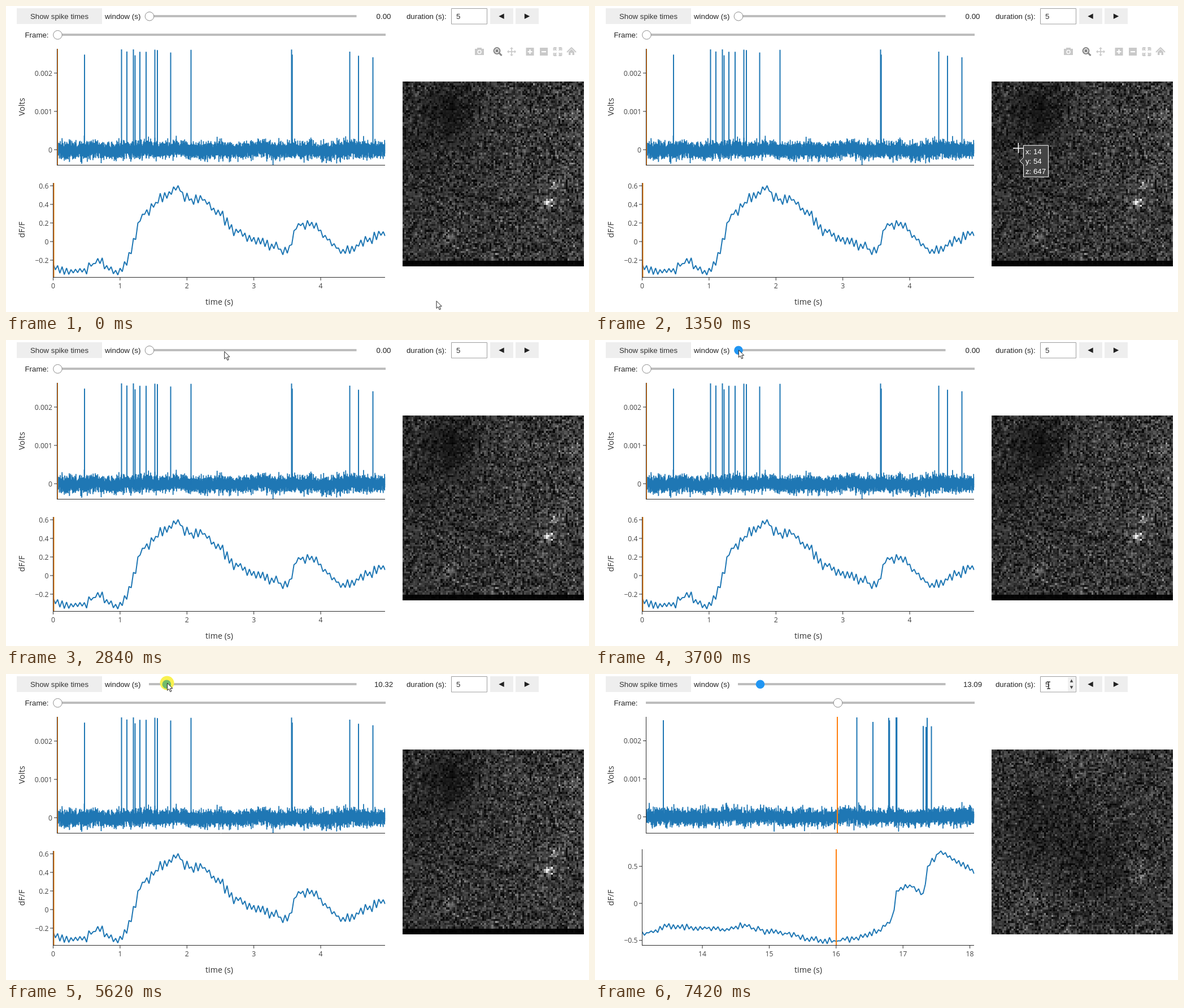
Animation, 1032 px wide and 543 px high, one loop 8 s. Source, as an HTML page with a canvas:

```html
<!DOCTYPE html>
<html lang="en">
<head>
<meta charset="utf-8">
<title>Spike viewer</title>
<style>
html, body { margin: 0; width: 100%; height: 100%; overflow: hidden; background: #fff; }
canvas { display: block; }
</style>
</head>
<body>
<canvas id="stage" width="1032" height="543"></canvas>
<script>
const ctx = document.getElementById('stage').getContext('2d');
const LOOP = 8000, REDRAW = 6980, PRESS = 4830, RELEASE = 6490;
const BLUE = '#1f77b4', ORANGE = '#ff7f0e', ACCENT = '#2196f3', INK = '#2a2a2a';
const UI = '13.25px "Liberation Sans", Arial, sans-serif';
const TICK = '12.25px "Open Sans", sans-serif';
const TITLE = '14.25px "Open Sans", sans-serif';
const MAP = { x: 702, y: 134, w: 321, h: 328, cols: 100, rows: 96 };

const clamp = (v, a = 0, b = 1) => Math.min(b, Math.max(a, v));
const ramp = (t, a, b) => clamp((t - a) / (b - a));

// Linear interpolation through [position, ...values] points
function along(points, at) {
  let i = points.findIndex(p => p[0] > at);
  if (i < 0) i = points.length - 1;
  i = Math.max(i, 1);
  const a = points[i - 1], b = points[i], k = ramp(at, a[0], b[0]);
  return a.slice(1).map((v, j) => v + (b[j + 1] - v) * k);
}

function seeded(seed) {
  return () => {
    seed = (seed + 0x6D2B79F5) | 0;
    let r = Math.imul(seed ^ (seed >>> 15), 1 | seed);
    r = (r + Math.imul(r ^ (r >>> 7), 61 | r)) ^ r;
    return ((r ^ (r >>> 14)) >>> 0) / 4294967296;
  };
}
function gaussian(rand) {
  return Math.sqrt(-2 * Math.log(rand() + 1e-9)) * Math.cos(6.2832 * rand());
}

// Pointer path: time, x, y
const PATH = [
  [590, 762, 523], [1000, 785, 390], [1250, 752, 275], [1350, 749, 252], [1400, 748, 250],
  [1960, 602, 122], [2150, 580, 117], [2210, 577, 116], [2840, 387, 20], [2950, 361, 21],
  [3020, 358, 21], [3450, 256, 19], [3760, 254, 17], [4200, 254, 18], [4880, 254, 18],
  [5820, 294, 15], [6810, 294, 15], [6860, 295, 15], [7420, 803, 20]
];
function pointer(t) {
  const [x, y] = along(PATH, t);
  return { x, y };
}

function voltage(seed, mid) {
  const rand = seeded(seed), pts = [];
  for (let x = 91; x <= 671; x += 0.08) {
    const drift = 2 * Math.sin(x / 17) * Math.sin(x / 41);
    pts.push([x, mid + drift + 7.2 * gaussian(rand)]);
  }
  return pts;
}
function spikes(seed, xs) {
  const rand = seeded(seed);
  return xs.map(x => [x, 77 + 18 * rand() ** 2]);
}
// Smooth course with a saw-like jitter, one sample per camera frame
function fluorescence(seed, course, jitter) {
  const rand = seeded(seed), pts = [];
  for (let i = 0; i < 150; i++) {
    const x = Math.min(83.5 + 3.947 * i, 671);
    const side = i % 2 ? 1 : -1;
    pts.push([x, along(course, x)[0] + side * jitter * rand()]);
  }
  return pts;
}
function ticks(first, last, step, place, label) {
  const list = [];
  for (let v = first; v <= last + step / 2; v += step) list.push([label(v), place(v)]);
  return list;
}

function heatmap(seed, level) {
  const c = document.createElement('canvas');
  c.width = MAP.cols;
  c.height = MAP.rows;
  const g = c.getContext('2d'), rand = seeded(seed);
  for (let y = 0; y < MAP.rows; y++) for (let x = 0; x < MAP.cols; x++) {
    const base = level(x, y);
    const v = Math.round(clamp(base * (1 + 0.54 * gaussian(rand)), base * 0.15, 245));
    g.fillStyle = `rgb(${v},${v},${v})`;
    g.fillRect(x, y, 1, 1);
  }
  return c;
}
const blob = (x, y, cx, cy, r) => Math.exp(-((x - cx) ** 2 + (y - cy) ** 2) / (r * r));

const plain = v => String(Math.round(v * 1000) / 1000).replace('-', '−');

const VIEWS = [{
  spikes: spikes(3, [139, 204.5, 214, 225.5, 228.5, 237, 248, 263.5, 268, 291.5, 327.5,
    505.5, 506.7, 608.5, 624, 649.5]),
  volts: voltage(11, 255.5),
  dff: fluorescence(8, [[84, 459], [107, 474], [131, 472], [166, 452], [196, 474], [218, 447],
    [238, 376], [280, 334], [305, 323], [322, 343], [348, 340], [380, 370], [400, 396], [435, 412],
    [490, 434], [504, 424], [514, 387], [548, 390], [580, 427], [604, 435], [671, 401]], 11),
  top: 314, cursor: [91, 84.5], frame: 91.5,
  voltTicks: ticks(0, 0.002, 0.001, v => 255 - v * 68000, plain),
  dffTicks: ticks(-0.2, 0.6, 0.2, v => 418 - v * 165, plain),
  timeTicks: ticks(0, 4, 1, v => 83.5 + v * 118.4, plain),
  map: heatmap(5, (x, y) => y > 92 ? 4 : 48 + 0.09 * x
    - 26 * blob(x, y, 27, 14, 15) - 8 * blob(x, y, 6, 40, 30)
    + 160 * blob(x, y, 80, 62.5, 2.4) + 40 * blob(x, y, 84, 53, 3)
    + 30 * blob(x, y, 95, 16, 4) + 18 * blob(x, y, 24, 80, 7))
}, {
  spikes: spikes(6, [121, 463.5, 492, 520, 521.3, 533, 534.3, 581, 586, 588, 595.5]),
  volts: voltage(29, 253.5),
  dff: fluorescence(4, [[84, 463], [127, 447], [200, 452], [226, 454], [262, 445], [300, 457],
    [340, 460], [372, 470], [427, 474], [470, 468], [510, 451], [526, 433], [534, 387], [560, 373],
    [581, 392], [589, 342], [609, 317], [637, 329], [671, 351]], 6),
  top: 311, cursor: [429, 427], frame: 430,
  voltTicks: ticks(0, 0.002, 0.001, v => 253.5 - v * 67500, plain),
  dffTicks: ticks(-0.5, 0.5, 0.5, v => 407 - v * 131.5, plain),
  timeTicks: ticks(14, 18, 1, v => 190 + (v - 14) * 118.4, plain),
  map: heatmap(17, (x, y) => 50
    - 16 * blob(x, y, 30, 36, 24) - 14 * blob(x, y, 60, 60, 22)
    + 34 * blob(x, y, 81, 63, 6) + 10 * blob(x, y, 50, 3, 14) + 10 * blob(x, y, 20, 80, 14))
}];

function text(s, x, y, font, color = '#333', align = 'left') {
  ctx.font = font;
  ctx.fillStyle = color;
  ctx.textAlign = align;
  ctx.textBaseline = 'alphabetic';
  ctx.fillText(s, x, y);
}
function sideways(s, x, y) {
  ctx.save();
  ctx.translate(x, y);
  ctx.rotate(-Math.PI / 2);
  text(s, 0, 5, TITLE, '#333', 'center');
  ctx.restore();
}
function rect(x, y, w, h, color) {
  ctx.fillStyle = color;
  ctx.fillRect(x, y, w, h);
}
function poly(pts, color, width, fill) {
  ctx.beginPath();
  pts.forEach(p => ctx.lineTo(p[0], p[1]));
  if (fill) {
    ctx.closePath();
    ctx.fillStyle = fill;
    ctx.fill();
  }
  if (width) {
    ctx.strokeStyle = color;
    ctx.lineWidth = width;
    ctx.lineJoin = 'bevel';
    ctx.stroke();
  }
}
const line = (x1, y1, x2, y2, color, width = 1) => poly([[x1, y1], [x2, y2]], color, width);
function disc(x, y, r, fill, border) {
  ctx.beginPath();
  ctx.arc(x, y, r, 0, 7);
  ctx.fillStyle = fill;
  ctx.fill();
  if (border) {
    ctx.strokeStyle = border;
    ctx.lineWidth = 1;
    ctx.stroke();
  }
}
function clipped(x, y, w, h, draw) {
  ctx.save();
  ctx.beginPath();
  ctx.rect(x, y, w, h);
  ctx.clip();
  draw();
  ctx.restore();
}

function drawPlots(v) {
  clipped(90, 76, 581.5, 206, () => {
    poly(v.volts, BLUE, 1.8);
    v.spikes.forEach(([x, top]) => line(x, 258, x, top, BLUE, 2));
  });
  clipped(83, v.top - 1, 588.5, 482 - v.top, () => poly(v.dff, BLUE, 2));
  line(v.cursor[0], 76, v.cursor[0], 282, ORANGE, 2);
  line(v.cursor[1], v.top, v.cursor[1], 481, ORANGE, 2);
  line(90.5, 76, 90.5, 283, INK);
  line(90, 282.5, 671, 282.5, INK);
  line(83.5, v.top, 83.5, 482, INK);
  line(83, 481.5, 671, 481.5, INK);
  for (const [s, y] of v.voltTicks) {
    line(85, y, 90, y, INK);
    text(s, 82, y + 4.5, TICK, '#444', 'right');
  }
  for (const [s, y] of v.dffTicks) {
    line(78, y, 83, y, INK);
    text(s, 75.5, y + 4.5, TICK, '#444', 'right');
  }
  for (const [s, x] of v.timeTicks) {
    line(x, 482, x, 487, INK);
    text(s, x, 501, TICK, '#444', 'center');
  }
  sideways('Volts', 28, 179);
  sideways('dF/F', 28, 397);
  text('time (s)', 377.5, 529.5, TITLE, '#333', 'center');
  ctx.imageSmoothingEnabled = false;
  ctx.drawImage(v.map, MAP.x, MAP.y, MAP.w, MAP.h);
}

function triangle(x, y, dx, dy, color = '#222') {
  poly([[x + dx, y + dy], [x - dx + dy, y - dy + dx], [x - dx - dy, y - dy - dx]], 0, 0, color);
}
function drawControls(t, view, tip) {
  rect(19, 4, 151, 28, '#eee');
  text('Show spike times', 94.5, 23, UI, '#333', 'center');
  text('window (s)', 175, 23, UI, '#222');
  text('Frame:', 33.5, 56, UI, '#222');

  const drag = t < PRESS ? 0 : 38.5 * clamp((tip.x - 254) / 40);
  const pressed = t >= PRESS && t < RELEASE, hot = t >= 3590;
  rect(253, 16, 367.5, 4, '#bdbdbd');
  const glow = t < PRESS ? 0 : 1 - ramp(t, 6450, 6610);
  if (glow) {
    ctx.globalAlpha = glow;
    disc(tip.x - 0.5, tip.y + 0.4, 12.5, '#f9f150');
    ctx.globalAlpha = 1;
  }
  disc(254 + drag, 18.3, 7.8, pressed ? '#72bb6a' : hot ? ACCENT : '#fff', hot ? null : '#8c8c8c');
  text((drag * 0.34).toFixed(2), 668.5, 23, UI, '#222', 'center');
  rect(90, 49, 582, 4, '#bdbdbd');
  disc(view.frame, 51.3, 7.8, '#fff', '#8c8c8c');

  text('duration (s):', 709, 23, UI, '#222');
  ctx.strokeStyle = '#9e9e9e';
  ctx.lineWidth = 1;
  ctx.strokeRect(788.5, 4.5, 63, 27.5);
  text('5', 797, 23, UI, '#333');
  if (t > REDRAW && tip.x > 788) {
    rect(837, 6, 13, 25, '#f0f0f0');
    triangle(843.5, 12, 0, -2.8, '#444');
    triangle(843.5, 24, 0, 2.8, '#444');
  }
  rect(857, 4, 41, 28, '#eee');
  rect(902, 4, 41, 28, '#eee');
  triangle(877, 18.3, -4.7, 0);
  triangle(922.5, 18.3, 4.7, 0);
}

function arrows(diagonal, color) {
  ctx.save();
  if (diagonal) ctx.rotate(Math.PI / 4);
  for (let i = 0; i < 4; i++) {
    poly([[8, 0], [5, -3], [5, 3]], 0, 0, color);
    line(diagonal ? 3 : 0, 0, 6, 0, color, 1.7);
    ctx.rotate(Math.PI / 2);
  }
  ctx.restore();
}
function square(plus, color) {
  rect(-7, -7, 14, 14, color);
  rect(-4, -1, 8, 2.2, '#fff');
  if (plus) rect(-1.1, -4, 2.2, 8, '#fff');
}
function dashedBox(color, dash) {
  ctx.setLineDash(dash);
  ctx.strokeStyle = color;
  ctx.lineWidth = 1.8;
  ctx.strokeRect(-7, -7, 14, 14);
  ctx.setLineDash([]);
}
const ICONS = {
  camera(c) {
    rect(-8, -5, 16, 11, c);
    rect(-4, -7, 8, 3, c);
    disc(0, 0.5, 3.7, '#fff');
    disc(0, 0.5, 2.2, c);
  },
  zoom(c) {
    ctx.beginPath();
    ctx.arc(-1.5, -1.5, 5.3, 0, 7);
    ctx.strokeStyle = c;
    ctx.lineWidth = 2.2;
    ctx.stroke();
    line(2.5, 2.5, 7, 7, c, 3);
    rect(-4, -4, 5, 5, c);
  },
  pan: c => arrows(false, c),
  plus: c => square(true, c),
  minus: c => square(false, c),
  fit(c) {
    arrows(true, c);
    dashedBox(c, [5, 4, 5, 0]);
  },
  home(c) {
    poly([[-8, 1], [0, -7], [8, 1]], c, 2);
    poly([[-5, 0.5], [0, -4.5], [5, 0.5], [5, 6], [-5, 6]], 0, 0, c);
    rect(-1.5, 2, 3, 4, '#fff');
  },
  select: c => dashedBox(c, [3, 2]),
  lasso(c) {
    ctx.strokeStyle = c;
    ctx.lineWidth = 1.8;
    ctx.beginPath();
    ctx.ellipse(0, -2, 7.5, 4.5, -0.15, 0, 7);
    ctx.moveTo(-5, 1);
    ctx.quadraticCurveTo(-2, 4, -5, 7);
    ctx.stroke();
  }
};
// Groups of icons; a wider gap separates the groups
function modebar(groups, x, alpha) {
  for (const group of groups) {
    for (const name of group) {
      ctx.save();
      ctx.globalAlpha = alpha;
      ctx.translate(x, 81);
      ICONS[name](name === 'zoom' ? '#858585' : '#c9c9c9');
      ctx.restore();
      x += 24.5;
    }
    x += 8;
  }
}
function drawModebars(t) {
  modebar([['camera'], ['zoom', 'pan'], ['plus', 'minus', 'fit', 'home']], 838, 1 - ramp(t, 1800, 2020));
  const shown = ramp(t, 1700, 1880) * (1 - ramp(t, 2520, 2760));
  if (shown) clipped(525, 70, 148, 22, () => {
    rect(526, 73, 147, 17, `rgba(255,255,255,${0.6 * shown})`);
    modebar([['camera'], ['zoom', 'pan', 'select', 'lasso'], ['plus']], 534, shown);
  });
}

const inMap = p => p.x > MAP.x && p.y > MAP.y && p.y < MAP.y + MAP.h;
const inVolts = p => p.x > 90 && p.x < 671 && p.y > 76 && p.y < 282;

function bubble(x, y, w, h, fill) {
  const l = x + 6.5, r = l + w, a = h / 2;
  poly([[x, y], [l, y - 6], [l, y - a], [r, y - a], [r, y + a], [l, y + a], [l, y + 6], [x, y]], '#fff', 1, fill);
}
function drawHover(t, tip) {
  const lag = pointer(t - 100);
  if (inMap(tip) && inMap(lag)) {
    const col = Math.floor((lag.x - MAP.x) / MAP.w * MAP.cols) - 1;
    const row = Math.floor((MAP.y + MAP.h - lag.y) / MAP.h * MAP.rows);
    const z = 500 + (col * 37 + row * 71 + 195) % 400;
    bubble(lag.x, lag.y + 0.5, 44, 56, '#444');
    [`x: ${col}`, `y: ${row}`, `z: ${z}`].forEach((s, i) =>
      text(s, lag.x + 10, lag.y - 12 + i * 17.5, UI, '#fff'));
  } else if (t > 1900 && t < 2060) {
    clipped(90, 70, 583, 212, () => {
      bubble(609, 122, 130, 20, BLUE);
      text('(4.4587, 0.001956)', 618.5, 126.5, UI, '#fff');
    });
  }
}

function drawPointer(t, { x, y }) {
  if (inMap({ x, y }) || inVolts({ x, y })) {
    const c = x > MAP.x ? '#fff' : '#000';
    line(x - 9, y + 0.5, x + 9, y + 0.5, c, 1.6);
    line(x + 0.5, y - 9, x + 0.5, y + 9, c, 1.6);
  } else if (t > REDRAW && x > 788) {
    line(x, y - 6, x, y + 6, '#111', 1.2);
    for (const s of [-6, 6]) line(x - 3, y + s, x + 3, y + s, '#111', 1.2);
  } else {
    const shape = [[0, 0], [0, 13], [3, 10.3], [5.2, 15.4], [7.4, 14.4], [5.3, 9.5], [9.3, 9.3], [0, 0]];
    poly(shape.map(p => [x + p[0], y + p[1] + 0.5]), '#222', 1, '#fff');
  }
}

function render(t) {
  const tip = pointer(t), view = VIEWS[t < REDRAW ? 0 : 1];
  rect(0, 0, 1032, 543, '#fff');
  drawPlots(view);
  drawControls(t, view, tip);
  drawModebars(t);
  drawHover(t, tip);
  drawPointer(t, tip);
}

const start = performance.now();
function tick() {
  render((performance.now() - start) % LOOP);
  requestAnimationFrame(tick);
}
tick();
</script>
</body>
</html>
```
